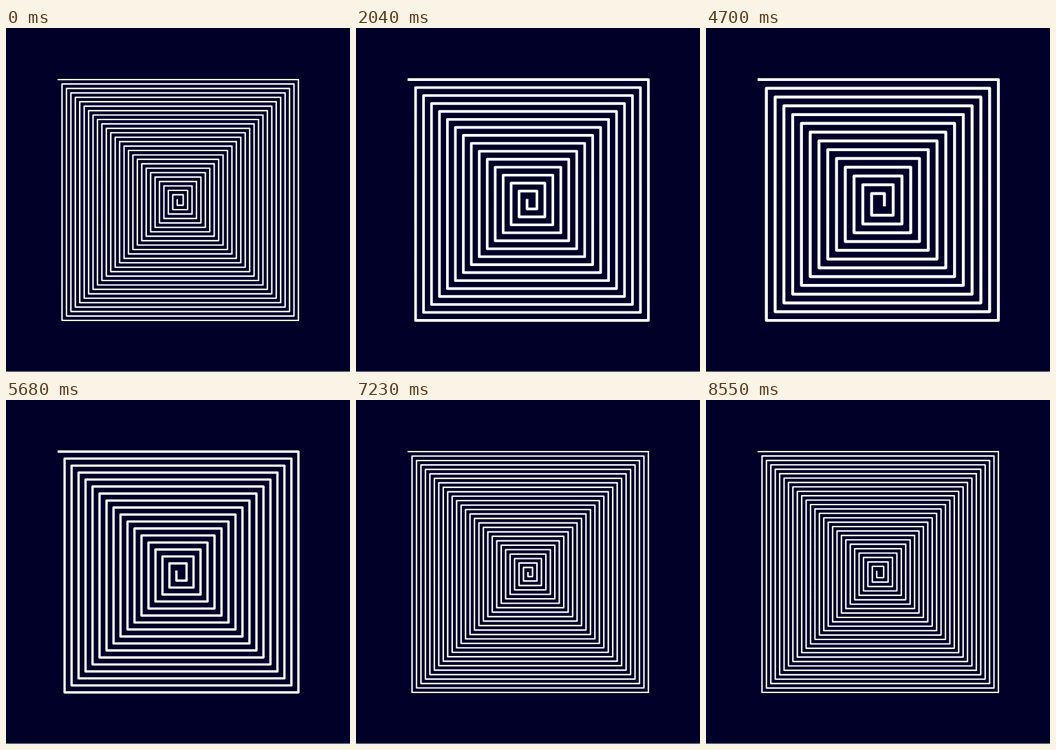
Write an HTML page that moves like this. It is 500x500 px and loops after 8.57 s.

```html
<!DOCTYPE html>
<html lang="en">
<head>
<meta charset="utf-8">
<title>Square spiral</title>
<style>
  html, body { margin: 0; width: 100%; height: 100%; overflow: hidden; background: #000028; }
  svg { display: block; width: 100%; height: 100%; }
</style>
</head>
<body>
<svg viewBox="0 0 500 500">
  <rect width="500" height="500" fill="#000028"/>
  <rect y="499.3" width="500" height="0.7" fill="#c8c8d0"/>
  <path id="spiral" fill="none" stroke="#fff" stroke-linejoin="round"/>
</svg>
<script>
  const LOOP = 8570;
  const SIZE = 350;
  const START = 75;
  const spiral = document.getElementById('spiral');

  // The gap between turns swings between 6 and 14, slightly unevenly in time.
  function gapAt(time) {
    const angle = 2 * Math.PI * time / LOOP;
    return 10 - 4 * Math.cos(angle + 0.49 - 0.02 * Math.cos(angle - 0.5));
  }

  // Right and down share one length, left and up the next shorter one.
  function spiralPath(gap) {
    let d = `M${START} ${START}`;
    let sign = 1;
    for (let length = SIZE; length >= gap; length -= gap) {
      const step = (sign * length).toFixed(3);
      d += `h${step}v${step}`;
      sign = -sign;
    }
    return d;
  }

  function draw(time) {
    const gap = gapAt(time);
    spiral.setAttribute('d', spiralPath(gap));
    spiral.setAttribute('stroke-width', (gap / 3).toFixed(3));
  }

  const begin = performance.now();
  function tick() {
    draw((performance.now() - begin) % LOOP);
    requestAnimationFrame(tick);
  }
  draw(0);
  requestAnimationFrame(tick);
</script>
</body>
</html>
```
